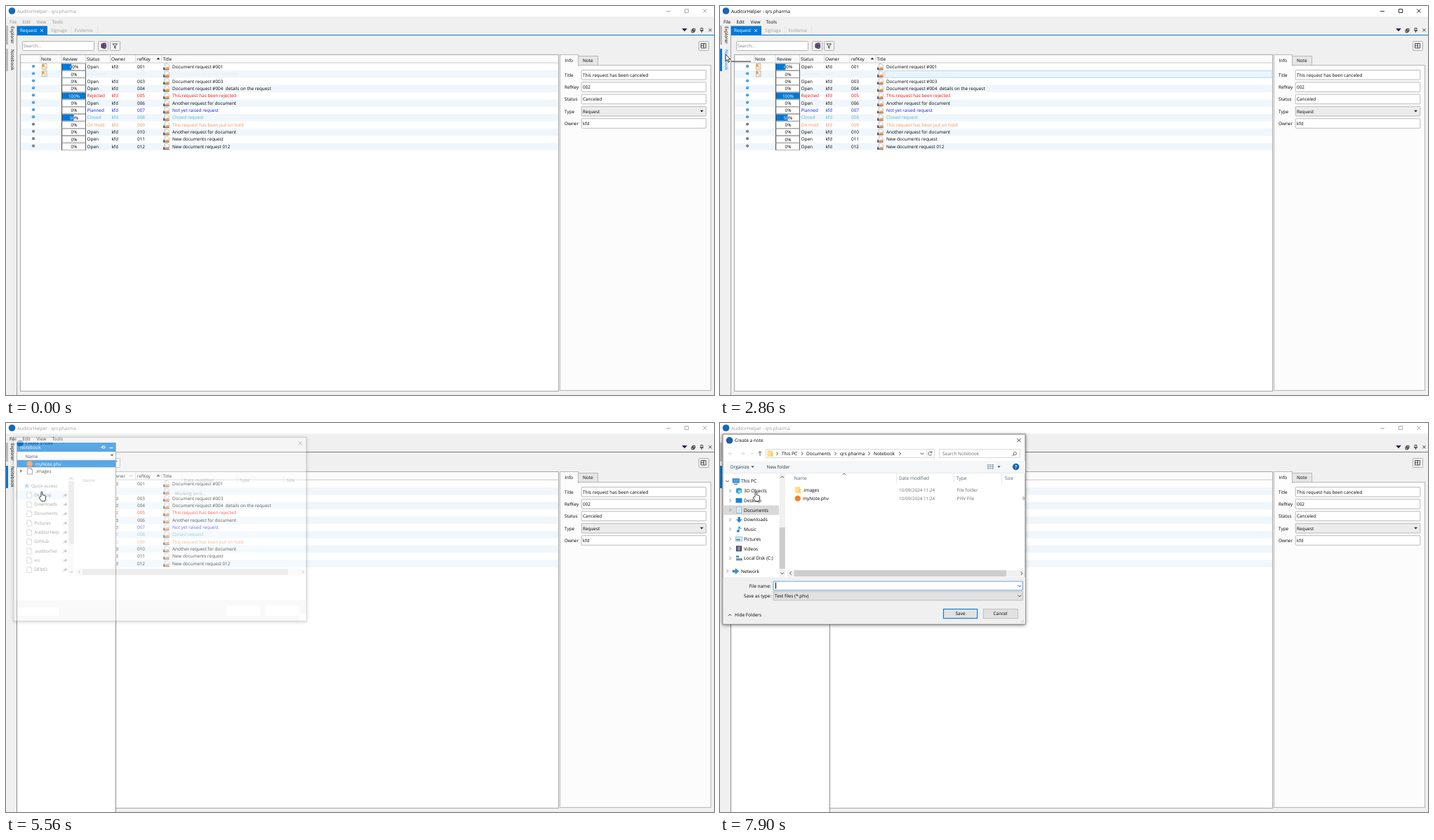
An HTML page that plays this animation: 1009 px wide and 555 px high, repeating every 8000 ms.

```html
<!DOCTYPE html>
<html lang="en">
<head>
<meta charset="utf-8">
<title>AuditorHelper</title>
<style>
html, body { margin: 0; width: 100%; height: 100%; overflow: hidden; background: #f0f0f0; }
svg { display: block; }
text { font-family: "Open Sans", "Noto Sans", sans-serif; text-rendering: geometricPrecision; white-space: pre; }
#window { filter: drop-shadow(0 1px 2.5px #0008); }
</style>
</head>
<body>
<svg id="stage" width="1009" height="555" viewBox="0 0 1009 555"></svg>
<script>
const BLUE = '#0078d7', GREY = '#a0a0a0', NAVY = '#1e395b', DIM = '#6d6d6d';
const APP = 'AuditorHelper', FIRM = 'qrs pharma', USER = 'kfd';

// Shape helpers, each returning SVG markup
const R = (x, y, w, h, fill, stroke = 'none', sw = 1) =>
  `<rect x="${x}" y="${y}" width="${w}" height="${h}" fill="${fill}" stroke="${stroke}" stroke-width="${sw}"/>`;
const box = (x, y, w, h, fill, stroke, r = 0, sw = 1) =>
  `<rect x="${x + .5}" y="${y + .5}" width="${w - 1}" height="${h - 1}" rx="${r}" fill="${fill}" stroke="${stroke}" stroke-width="${sw}"/>`;
const T = (x, y, s, fill = '#000', size = 6.4, more = '') =>
  `<text x="${x}" y="${y}" fill="${fill}" font-size="${size}" ${more}>${s}</text>`;
const D = (x, y, s, fill) => T(x, y, s, fill, 6.5);
const P = (d, stroke = '#222', sw = .8, fill = 'none') =>
  `<path d="${d}" fill="${fill}" stroke="${stroke}" stroke-width="${sw}"/>`;
const C = (x, y, r, fill) => `<circle cx="${x}" cy="${y}" r="${r}" fill="${fill}"/>`;
const G = (id, body) => `<g id="${id}">${body}</g>`;
const cross = (x, y, r, c, w) => P(`M${x - r} ${y - r}l${2 * r} ${2 * r}m0 ${-2 * r}l${-2 * r} ${2 * r}`, c, w);
const turned = (x, y, a, d, c, fill = 'none') =>
  `<path transform="translate(${x} ${y}) rotate(${a})" d="${d}" fill="${fill}" stroke="${c}"/>`;
// Open chevron and solid triangle: angle 0 points down
const chev = (x, y, a = 0, c = '#444') => turned(x, y, a, 'M-2.2 -1.1L0 1.1L2.2 -1.1', c);
const tri = (x, y, a = 0, c = '#222', k = 1) =>
  turned(x, y, a, `M${-2.4 * k} ${-1.2 * k}H${2.4 * k}L0 ${1.4 * k}Z`, 'none', c);
const page = (x, y, c = '#777') =>
  P(`M${x} ${y}h5l2 2v6.5h-7zM${x + 5} ${y}v2h2`, c, .7, '#fff');
const pin = (x, y, c) => P(`M${x - 3} ${y + 3}l2-2m-1-2l3 3m-1.5-1.5l2-2.5l2 2l-2.5 2`, c, .8, c);
const folder = (x, y) => R(x, y, 7.5, 9, '#ffe08a') + R(x + 5, y + 3, 3, 6, '#f5cf66');
const each = (list, f) => list.map(f).join('');

function titleBar() {
  return R(0, 0, 1009, 15, '#fff') + C(8.5, 7, 4.8, '#1767b8') +
    G('title', T(16, 9.5, `${APP} - ${FIRM}`, 'currentColor', 6.5) +
      P('M941 7.5h6', 'currentColor') + P('M967.5 4.5h5v5h-5z', 'currentColor') +
      cross(996, 7, 2.7, 'currentColor', .8)) +
    G('menu', each([['File', 5], ['Edit', 23.5], ['View', 43.5], ['Tools', 65.5]],
      ([s, x]) => T(x, 24.5, s, 'currentColor')));
}

const sideTab = (s, y, fill) => T(0, 0, s, fill, 6.4, `transform="translate(6.8 ${y}) rotate(90)"`);

function sideBar() {
  return R(0, 28, 3, 27, '#bdbdbd') + sideTab('Explorer', 29) +
    G('tabBar', R(0, 61, 3, 32, 'currentColor')) +
    G('tabText', sideTab('Notebook', 62, 'currentColor')) + R(15, 28, 1, 527, GREY);
}

function tabBar() {
  return G('focusLine', R(16, 41, 993, 1, 'currentColor')) +
    R(16, 28.5, 43, 13, BLUE) + T(20, 37.2, 'Request', '#fff') + cross(51, 35, 2, '#fff', .8) +
    T(64, 37.2, 'Signage', GREY) + T(97.5, 37.2, 'Evidence', GREY) +
    R(92.5, 29, 1, 12, '#e2e2e2') + R(130, 29, 1, 12, '#e2e2e2') +
    tri(967, 34, 0, '#32184a', 1.6) +
    P('M978.5 32.5h3.5v3.5h-3.5zM977 34h3.5v3.5h-3.5z', '#222', .9, '#f0f0f0') +
    P('M990 31.5h3v3.5h-3zM989 35.2h5M991.5 35v3') + cross(1003.5, 34.3, 2, '#222', .9);
}

function toolBar() {
  return box(23, 50, 103, 14, '#fff', '#b4b4b4', 1) + T(25, 59.4, 'Search...', '#808080') +
    each([131, 148, 987], x => box(x, 50, 15, 14, '#f3f3f3', '#adadad', 1)) +
    P('M136 54l5-1.3l1.5 1v6l-1.5 1l-5-1.3z', '#33184a', .8, '#7b6a8a') + P('M135.5 57h7M139 53v7.5', '#33184a') +
    P('M152 54h6.5l-2.5 3v3.5l-1.5-1v-2.5z') +
    P('M990.5 53.5h7v6.5h-7zM994.5 53.5v6.5M990.5 56.7h4');
}

const docIcon = y => P(`M226.5 ${y - 4.3}h3.8l2 2v5h-5.8z`, '#999', .6, '#fff') +
  P(`M227 ${y + 2}q2-3 5.5-1v3h-5.5z`, 'none', 0, '#eba25e') +
  P(`M224.8 ${y}v4h8`, '#6a4a4a', .8) + R(224.3, y + 1.3, 2, 3, '#444a66');
const noteIcon = y => P(`M51.5 ${y - 4}h6.5v8h-6.5z`, '#a08a70', .6, '#fdf6e8') +
  C(53, y - 1.5, 2, '#f0a440') + P(`M54 ${y + .5}h3m-3 1.6h3`, '#9ab', .5);

const rows = [
  [40, 'Open', 'Document request #001'],
  [0, 'Canceled', 'This request has been canceled', '#e4ecf2'],
  [0, 'Open', 'Document request #003'],
  [0, 'Open', 'Document request #004  details on the request'],
  [100, 'Rejected', 'This request has been rejected', '#f00'],
  [0, 'Open', 'Another request for document'],
  [0, 'Planned', 'Not yet raised request', '#0018ff'],
  [50, 'Closed', 'Closed request', '#4db2d0'],
  [0, 'On Hold', 'This request has been put on hold', '#f0904e'],
  [0, 'Open', 'Another request for document'],
  [0, 'Open', 'New documents request'],
  [0, 'Open', 'New document request 012'],
];

function progress(y, pct) {
  const label = (x, dy, c) => T(x, dy, pct + '%', c, 6.4, 'text-anchor="middle"');
  const w = 33 * pct / 100;
  return R(79.5, y - 4.8, 34, 9.6, '#fff', '#9a9a9a', .8) + R(79.2, y - 5, .9, 10, '#333') +
    R(113, y - 5, .9, 10, '#555') + label(97, y + 2.3) + R(80, y - 4.4, w, 8.8, BLUE) +
    (w ? `<svg x="80" y="${y - 5}" width="${w}" height="10">${label(17, 7.3, '#fff')}</svg>` : '');
}

function table() {
  const heads = [['Note', 50], ['Review', 81], ['Status', 115], ['Owner', 150], ['refKey', 187], ['Title', 223.5]];
  const rowY = i => 86.9 + 10.33 * i;
  return box(20, 69, 768, 481, '#fff', '#a8a8a8') + R(21, 70, 766, 11, '#fbfbfb') +
    R(21, 80.6, 766, .9, '#c4c4c4') +
    each(heads, ([s, x]) => T(x, 78.4, s)) +
    each([48.5, 78.5, 113, 148, 184.5, 221.5], x => R(x, 70, .8, 11, '#cfcfcf')) + tri(217, 75, 180) +
    each(rows, (r, i) => i % 2 ? R(21, rowY(i) - 5.1, 766, 10.3, '#eff6fc') : '') +
    G('current', R(235, rowY(1) - 4.9, 552, 9.8, '#e9f5ff', '#a5d2f5', .8)) +
    each(rows, ([pct, status, title, c = '#000'], i) => {
      const y = rowY(i), b = y + 2.2;
      return C(39, y - 1, 2.1, i < 8 ? '#3c93dc' : '#7a7a7a') + C(38.6, y - 1.5, .8, i < 8 ? '#9ccbf2' : '#999') +
        (i < 2 ? noteIcon(y - .5) : '') + progress(y, pct) + T(115.5, b, status, c) + T(150.5, b, USER, c) +
        T(187, b, String(i + 1).padStart(3, '0'), c) + docIcon(y) + T(237, b, title, c);
    });
}

function infoPanel() {
  const fields = [['Title', 'This request has been canceled'], ['RefKey', '002'],
    ['Status', 'Canceled'], ['Type', 'Request'], ['Owner', USER]];
  return box(789, 84, 216, 465, '#fcfcfc', '#b8b8b8') + box(815, 71, 29, 14, '#e6e6e6', '#b8b8b8') +
    box(789, 69, 27, 17, '#fcfcfc', '#b8b8b8') + R(790, 84, 25, 3, '#fcfcfc') +
    T(796.5, 80.2, 'Info') + T(822, 80.4, 'Note') +
    each(fields, ([name, value], i) => {
      const y = 98.2 + 17.3 * i;
      return T(796, y + 2.4, name) +
        box(819.7, y - 7.2, 178.6, 14.6, name == 'Type' ? '#ececec' : '#fff', '#a4a4a4', 1, .75) + T(822, y + 2.5, value);
    }) +
    tri(991.5, 150);
}

function notebook() {
  return box(15, 28, 142, 528, '#fff', '#8c8c8c') + R(16, 28, 140, 13, BLUE) +
    T(20, 37.2, 'Notebook', '#fff') + P('M135 34.5h2.5m0-2v4m0-3.3h3.5v2.6h-3.5', '#fff', .9) +
    P('M147.5 35.5h5', '#fff', 1.2) + R(16, 41, 140, 11, '#fafafa') + R(16, 51.5, 140, .8, '#d5d5d5') +
    T(27.5, 49.7, 'Name') + tri(151, 46) +
    G('picked', R(16, 53, 140, 10.3, BLUE)) + C(33.7, 58.2, 4.3, '#f0802c') +
    G('noteName', T(42, 60.7, 'myNote.phv', 'currentColor')) +
    tri(21.5, 68.5, -90) + page(30.5, 64.5, '#6a4050') + T(41.5, 71, '.images');
}

function contextMenu() {
  return R(42, 96, 69, 27, '#0003') + box(40, 93, 69, 28, '#fff', '#a5a5a5') +
    G('hot', R(41, 94, 67, 13, BLUE)) +
    P('M45.5 96.5h4l2 2v5h-6zM48.5 99v3m-1.5-1.5h3', '#111', .9) +
    G('addText', T(56, 103, 'Add file', 'currentColor')) +
    P('M45 111.5h7M47.2 111.2v-1.2h2.6v1.2M46 112v5.5h5v-5.5M48.5 113.5v2.5', '#111', .9) + T(56, 116.6, 'Delete');
}

// Parts common to both stages of the dialog
function dialogFrame(listTop) {
  const cols = [['Name', 105.5], ['Date modified', 255], ['Type', 337], ['Size', 406]];
  return R(84.5, 72, 8.5, 147.5, '#f1f1f1') + chev(88.7, 77, 180) + chev(88.7, 214.5) +
    each(cols, ([s, x]) => D(x, 81.3, s, '#4c607a')) +
    each([251, 333, 401], x => R(x, 72, .8, 14, '#e2e2e2')) + chev(177, 73, 180, '#666') +
    R(96, 210, 338, 9.5, '#f1f1f1') + R(105.5, 210, 302.5, 9, '#cdcdcd') +
    chev(100.5, 214.5, 90) + chev(430, 214.5, -90) + R(84.8, listTop, 8, listTop < 100 ? 92 : 59, '#cdcdcd');
}

function loading() {
  const places = ['Desktop', 'Downloads', 'Documents', 'Pictures', 'AuditorHelp', 'GitHub', '.auditorhel', 'src', 'DEMO'];
  return R(4.5, 256, 430, 30.5, '#f0f0f0') + R(9.5, 267, 61, 12, '#fff') + R(317.3, 264.4, 50, 15, '#fff') +
    R(374.5, 264.4, 50, 15, '#fff') + R(424.7, 276.4, 10, 10, '#fff') + R(4.5, 94.8, 79.5, 13, '#e5f3ff') +
    P('M23.3 83.3l1.3 3h3l-2.4 2l1 3.2l-2.9-2l-2.9 2l1-3.2l-2.4-2h3z', 'none', 0, '#3a9be0') + D(29.8, 90, 'Quick access') +
    each(places, (s, i) => page(23.5, 97 + 13.73 * i) + D(34.3, 103.3 + 13.73 * i, s) + pin(79, 101.2 + 13.73 * i, '#66727e')) +
    dialogFrame(81) + D(241.4, 101.5, 'Working on it...', '#444');
}

const tree = [['3D Objects', '#2aa3c8'], ['Desktop', '#1683d8'], ['Documents', '#8fb4cc'], ['Downloads', '#2a83d4'],
  ['Music', '#1683d8'], ['Pictures', '#7fb0cf'], ['Videos', '#4a4a5c'], ['Local Disk (C:)', '#8a8f96']];
const treeIcon = (i, y, c) => [
  P(`M23 ${y - 3}l4-1.2l4 1.2v5.5l-4 2l-4-2z`, 'none', 0, c) + R(26, y - 1, 4, 4, '#8edcf0'),
  R(22.5, y - 3.3, 9, 6.6, c),
  R(23.5, y - 4.2, 7, 8.4, '#fff', c) + P(`M25 ${y - 1.5}h4m-4 2h4m-4 2h4`, c),
  P(`M25.5 ${y - 4}h3.4v3.6h2.6l-4.3 4.6l-4.3-4.6h2.6z`, 'none', 0, c),
  P(`M27 ${y + 2.5}v-6.5q.5 2 3 3`, c, 1.2) + C(25.7, y + 2.5, 1.8, c),
  R(22.5, y - 3, 9, 6, '#dcecf5', c, .8) + R(23.5, y, 5, 2, '#3a8a9c'),
  R(23, y - 4, 8, 8, c) + R(25, y - 3, 4, 6, '#7d8fb0'),
  R(23, y, 9, 3.4, c) + R(23, y - 3.6, 4, 2.6, '#1e96e0')][i];

function loaded() {
  const crumbs = [['This PC', 88], ['Documents', 123], [FIRM, 171], ['Notebook', 219]];
  const arrow = (x, s) => P(`M${x - 3 * s} 43.5h${6 * s}m${-2.5 * s}-2.5l${2.5 * s} 2.5l${-2.5 * s} 2.5`, '#d0d0d0');
  const file = (y, name, kind) => D(118, y, name) + T(255, y, '10/09/2024 11:24', DIM, 6.3) + D(337.5, y, kind, DIM);
  return arrow(15, -1) + arrow(32, 1) + chev(45.5, 43.5, 0, '#d8d8d8') + P('M57 47v-6.5m-2.7 2.7l2.7-2.7l2.7 2.7', '#444') +
    box(65, 37, 241, 13, '#fff', '#d9d9d9') + folder(67.5, 39) + R(294, 38, .8, 11, '#ddd') +
    each(crumbs, ([s, x]) => D(x, 45.8, s)) +
    each([81.5, 117, 164.5, 212.5, 256.5], x => chev(x, 43.7, -90)) + chev(288, 43.7) +
    P('M301.5 42a2.6 2.6 0 1 0 .4 2.4M302 40v2.3h-2.3', '#444') +
    box(312, 37, 116, 13, '#fff', '#d9d9d9') + D(317, 45.8, 'Search Notebook', DIM) +
    P('M419 45l-2.3 2.3M419 45a2 2 0 1 1 2.8-3a2 2 0 1 1-2.8 3', '#444') +
    R(5, 54, 430, 17, '#f5f6f7') + R(5, 71, 430, .8, '#e2e5e8') +
    D(14.5, 64.6, 'Organize', NAVY) + tri(46.5, 62.5, 0, NAVY, .9) + D(66.5, 64.6, 'New folder', NAVY) +
    P('M381 59.8h2.2m1 0h2.2m1 0h2.6M381 62.3h2.2m1 0h2.2m1 0h2.6M381 64.8h2.2m1 0h2.2m1 0h2.6', '#6a7f95', 1.2) +
    tri(397.5, 62.5, 0, NAVY, .9) + C(421.7, 62.5, 4.7, '#0f62ac') + T(420, 65, '?', '#fff', 7, 'font-weight="700"') +
    R(4.5, 117.5, 79.5, 13.7, '#d9d9d9') + chev(10.5, 83) + R(18, 79.3, 9.5, 6, '#3aa5e4', '#557', .6) + R(20, 87, 5.5, .9, '#557') +
    D(30, 85.3, 'This PC') +
    each(tree, ([s, c], i) => {
      const y = 96.8 + 13.73 * i;
      return chev(14.5, y, -90, '#888') + treeIcon(i, y, c) + D(34, y + 2.4, s);
    }) +
    chev(10.5, 211.3, -90, '#888') + P('M18 210h4v-2.5l5 4l-5 4v-2.5h-4z', '#4b6f94', .5, '#3a93d4') + D(30, 213.5, 'Network') +
    dialogFrame(149) + folder(107, 91) + file(97.8, '.images', 'File folder') +
    C(110.8, 107.6, 4.2, '#f0802c') + file(109.8, 'myNote.phv', 'PHV File') +
    `<svg width="434.5" height="120">${D(430.7, 109.8, '9', DIM)}</svg>` +
    R(4.5, 220, 430.5, 66.5, '#f0f0f0') + D(41.5, 234.6, 'File name:') + D(34, 249, 'Save as type:') +
    R(76, 226, 355.6, 12.6, '#fff', BLUE, .6) + chev(427, 232.5) +
    R(76, 240.4, 355.6, 12.6, '#e1e1e1', '#a4a4a4', .6) + D(78, 248.9, 'Text files (*.phv)') + chev(427, 246.7) +
    G('caret', R(79, 227.5, 1, 9, '#000')) + chev(14, 274, 180) + D(21, 276, 'Hide Folders') +
    R(318.5, 265.5, 48.2, 13.2, '#e1e1e1', BLUE, 1.1) + D(335.5, 274.3, 'Save') +
    R(375.5, 265.3, 49, 13.6, '#e1e1e1', '#a4a4a4', .6) + D(389.5, 274.3, 'Cancel') +
    P('M429 285l4-4m-1.5 4l1.5-1.5', '#bbb');
}

function dialog() {
  return G('window', R(4, 16, 431, 271, '#fff', '#6a6a6a', .8)) +
    C(13.5, 24.8, 4.8, '#1c5fa8') + D(21, 27.3, 'Create a note') + cross(426, 24.7, 2.7, '#222', .8) +
    G('loading', loading()) + G('loaded', loaded());
}

const cursor = () =>
  G('arrow', P('M0 0V9.6L2.2 7.6L3.9 11.4L5.5 10.7L3.9 7H6.9Z', '#111', .8, '#fff')) +
  G('hand', P('M0 7V1q0-1 1-1t1 1V4.6l3.6 .9q1 .4 1 1.5V10l-1 3.5H.5L-2.7 8.7q-.2-1.2 1-1Z', '#111', .8, '#fff'));

stage.innerHTML = R(0, 0, 1009, 555, '#f0f0f0') + titleBar() + sideBar() + tabBar() + toolBar() + table() + infoPanel() +
  G('sliver', R(16, 78.6, 28, 1, '#222')) + G('notebook', notebook()) + G('popup', contextMenu()) + G('dialog', dialog()) +
  G('cursor', cursor());

const $ = id => document.getElementById(id);
const clamp = v => Math.max(0, Math.min(1, v));
const show = (id, on) => $(id).style.display = on ? '' : 'none';
const tint = (id, c) => $(id).style.color = c;

// Pointer stops: time, x, y
const path = [[250, 500, 556], [1000, 367, 317], [1310, 367, 317], [1650, 26, 48], [2060, 8, 69],
  [3340, 8, 69], [3740, 40, 93], [4280, 40, 93], [4480, 50, 98]];

function pointer(t) {
  const i = path.findIndex(p => p[0] > t);
  if (i < 0) return path.at(-1).slice(1);
  if (!i) return path[0].slice(1);
  const [t0, x0, y0] = path[i - 1], [t1, x1, y1] = path[i];
  const k = (t - t0) / (t1 - t0), e = k * k * (3 - 2 * k);
  return [x0 + (x1 - x0) * e, y0 + (y1 - y0) * e];
}

function draw(t) {
  const within = (a, b) => t >= a && t < b;
  const opened = t >= 2930, picked = t >= 3740, hot = t >= 4340, pressed = t >= 4810;
  tint('title', within(250, 5350) ? '#000' : '#999');
  tint('menu', t >= 250 ? '#000' : '#8c8c8c');
  tint('tabBar', t >= 2060 ? BLUE : '#bdbdbd');
  tint('tabText', within(2060, 3400) ? BLUE : '#000');
  tint('focusLine', opened ? '#7c7c7c' : BLUE);
  show('current', within(250, 3740));
  show('sliver', within(2860, 2930));
  show('notebook', opened);
  show('picked', picked);
  tint('noteName', picked ? '#fff' : '#000');

  show('popup', within(3890, 5020));
  $('popup').style.opacity = Math.min(clamp((t - 3850) / 150), clamp((5020 - t) / 210));
  show('hot', hot);
  tint('addText', hot ? '#fff' : '#000');

  const rest = (1 - clamp((t - 5510) / 260)) ** 2, s = 1 - .05 * rest;
  show('dialog', t >= 5560);
  $('dialog').style.opacity = 1 - rest;
  $('dialog').setAttribute('transform', `translate(219.5 151.5) scale(${s}) translate(-219.5 -151.5)`);
  show('loading', t < 5840);
  show('loaded', t >= 5840);
  show('caret', within(6050, 6300) || within(6820, 7350) || t >= 7900);

  show('arrow', !pressed);
  show('hand', pressed);
  $('cursor').setAttribute('transform', `translate(${pointer(t).join(' ')})`);
}

function tick(now) {
  draw(now % 8000);
  requestAnimationFrame(tick);
}
draw(0);
requestAnimationFrame(tick);
</script>
</body>
</html>
```
